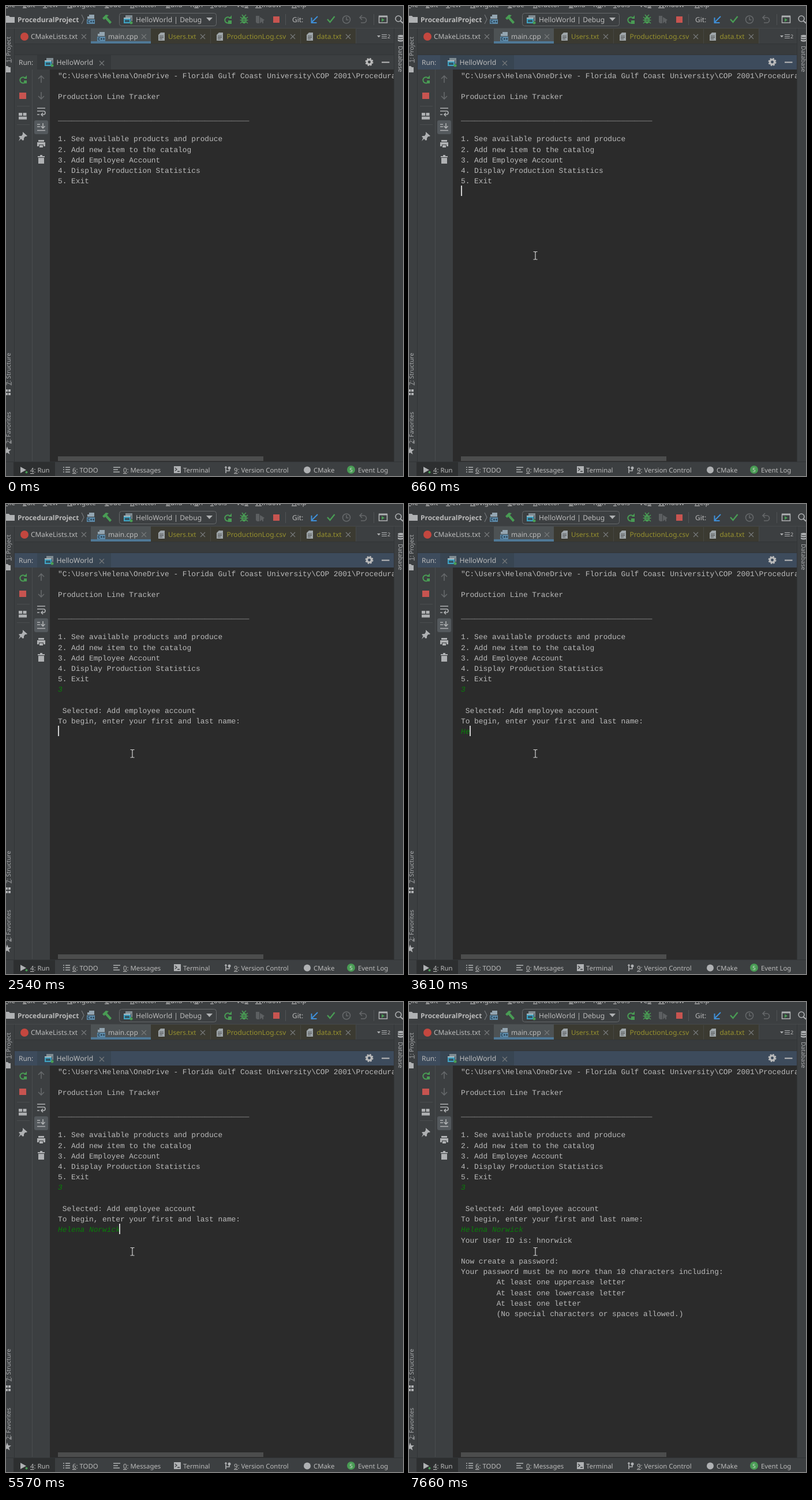
An HTML page for the animation above (8 s loop, 688 by 814 pixels).

```html
<!DOCTYPE html>
<html lang="en">
<head>
<meta charset="utf-8">
<title>Production Line Tracker</title>
<style>
html, body { margin: 0; width: 100%; height: 100%; overflow: hidden; background: #3c3f41; }
svg { display: block; width: 688px; height: 814px; }
text { font: 11.9px "Noto Sans", sans-serif; fill: #bbb; white-space: pre; text-rendering: geometricPrecision; }
.small text { font-size: 11.35px; }
.side text { font-size: 10.3px; fill: #a9abad; }
.olive text { fill: #97912f; }
#rows text { font: 12.85px "Liberation Mono", monospace; }
#rows .in { fill: #087f08; font-style: italic; }
u, .u { text-decoration: underline; }
.i { fill: none; stroke: #afb1b3; stroke-width: 1.6; }
.f { fill: #afb1b3; }
.dim { stroke: #65686a; }
.green { stroke: #499c54; }
.gf { fill: #499c54; }
.x { fill: none; stroke: #777a7c; stroke-width: 1.1; }
.line { stroke: #515456; fill: none; }
</style>
</head>
<body>
<svg viewBox="0 0 688 814">
  <defs>
    <path id="close" class="x" d="M-4-4L4 4M4-4L-4 4"/>
    <g id="rerun"><path class="i green" stroke-width="2" d="M4-3.5A5.2 5.2 0 1 0 5 3" style="stroke-width:2"/><path class="gf" d="M2-2h5v-6z"/></g>
    <g id="app">
      <path fill="#7f8b91" d="M3 0h12v10h-2V4H3z"/>
      <path fill="#40a4c4" d="M0 5h12v9H0z"/><path fill="#a9b7be" d="M0 4h12v2H0z"/>
      <path fill="#315767" d="M2 8h8v4H2z"/><circle class="gf" cx="13" cy="13" r="2.5"/>
    </g>
    <g id="cpp">
      <path fill="#93a5b1" d="M4 0h9v7H1V3h3z"/><path fill="#5c89a8" d="M0 8h14v8H0z"/>
      <path d="M5 10H2v4h3M6 12h3M7.500 10.500v3M10 12h3M11.500 10.500v3" stroke="#203544" fill="none"/>
    </g>
    <g id="doc"><path fill="#9da4a8" d="M4 0h7v14H0V4z"/><path d="M2 6h7M2 8.500h7M2 11h5" stroke="#4a4c4d" fill="none"/></g>
  </defs>

  <rect width="688" height="814" fill="#3c3f41"/>
  <g id="menu"></g>

  <!-- toolbar -->
  <path class="f" d="M0 17h5l2 2h8v10H0z"/>
  <text x="20" y="28" font-weight="700" style="font-weight:700">ProceduralProject</text>
  <path class="x" d="M131 15l4 8-4 8"/>
  <use href="#cpp" x="140" y="15"/>
  <path class="gf" d="M167 21l6-6 5 1-3 3 8 9-3 3-8-9-2 2z"/>
  <rect x="196.500" y="12.500" width="168" height="22" rx="4" fill="#3c3f41" stroke="#66696b"/>
  <use href="#app" x="204" y="16"/>
  <text x="225" y="28" style="font-size:12.1px">HelloWorld | Debug</text>
  <path class="f" d="M347 20h11l-5.500 6z"/>
  <use href="#rerun" x="384" y="24"/><path fill="#c75450" d="M386 24h6v6h-6z" opacity="0"/>
  <path class="gf" d="M385 25h6v6h-6z"/>
  <g><ellipse class="gf" cx="412.500" cy="24.500" rx="4.300" ry="6"/><path class="i green" d="M406 19l13 11M419 19l-13 11M405.500 24.500h14M409 15l3 4 4-4"/><path d="M410 23h5M410 26h5" stroke="#3c3f41"/></g>
  <path fill="#5c5f61" d="M433 17h6v13h-4l-2-2zM440 19l8 5-8 6z"/><path class="i dim" d="M445 30v-5"/>
  <path fill="#c75450" d="M463 18h11v11h-11z"/>
  <path class="line" d="M484.500 14v19M637.500 14v19"/>
  <text x="496" y="28">Git:</text>
  <path class="i" style="stroke:#3f8fd8;stroke-width:2" d="M540 18l-10 10M529.500 20v9h9"/>
  <path class="i green" style="stroke-width:2.4" d="M557 23l4.500 5 8-10"/>
  <circle class="i dim" cx="590" cy="23.500" r="6.500"/><path class="i dim" d="M590 19v5h3.500"/>
  <path class="i dim" d="M617 16l-4 4 4 4M613 20h7a4.500 4.500 0 0 1 0 9h-5"/>
  <path class="i" d="M646.500 18h14v11h-14z"/><path class="f" d="M646 16.500h15v3h-15z"/><path class="gf" d="M651 21l5 3-5 3.500z"/>
  <circle class="i" cx="680" cy="22" r="5"/><path class="i" style="stroke-width:2" d="M683.500 26l5 4"/>

  <!-- editor tabs -->
  <path fill="#3b3a31" d="M251 39h355v26H251z"/>
  <path fill="#4d5254" d="M147 39h104v26H147z"/><path fill="#4f7896" d="M147 61h104v4H147z"/>
  <path class="line" stroke-opacity=".5" d="M0 38.500h688M354.500 40v25M510.500 40v25M606.500 40v25"/>
  <circle cx="32" cy="53" r="7" fill="#c4473f"/>
  <text x="43" y="57">CMakeLists.txt</text>
  <use href="#cpp" x="158" y="45"/><text x="177" y="57">main.cpp</text>
  <g class="olive">
    <use href="#doc" x="264" y="46"/><text x="281" y="57" style="font-size:11.600px">Users.txt</text>
    <use href="#doc" x="365" y="46"/><text x="382.500" y="57">ProductionLog.csv</text>
    <use href="#doc" x="521" y="46"/><text x="538.500" y="57">data.txt</text>
  </g>
  <use href="#close" x="135" y="53"/><use href="#close" x="239" y="53"/><use href="#close" x="341" y="53"/>
  <use href="#close" x="497" y="53"/><use href="#close" x="593" y="53"/>
  <path class="f" d="M643 51h6l-3 3.500z"/><path d="M651 49.500h9M651 52.500h9M651 55.500h9" stroke="#afb1b3"/>
  <text x="661" y="56" style="font-size:9px">2</text>
  <path fill="#383b3d" d="M15 65h657v19H15z"/>
  <path d="M15 65.500h657M15 84.500h657" stroke="#323537"/>

  <!-- run panel -->
  <rect id="head" x="15" y="85" width="657" height="25"/>
  <rect id="tab" x="54" y="85" width="128" height="25"/>
  <text x="22" y="102">Run:</text>
  <use href="#app" x="67" y="90"/><text x="87.500" y="102" style="font-size:12.200px">HelloWorld</text>
  <use href="#close" x="166" y="99"/>
  <circle cx="629.500" cy="97" r="4" fill="none" stroke="#bbb" stroke-width="3.200"/>
  <circle cx="629.500" cy="97" r="6" fill="none" stroke="#bbb" stroke-width="2" stroke-dasharray="2.700 2.012"/>
  <path d="M651 97.500h13.500" stroke="#bbb" stroke-width="2"/>
  <path class="line" stroke-opacity=".7" d="M45.500 110v678M19 173.500h22M19 205.500h22"/>
  <use href="#rerun" x="29" y="128"/><path class="gf" d="M31 129h5v5h-5z"/>
  <path fill="#c75450" d="M23 150h12v11H23z"/>
  <path class="f" d="M22 185h6v5h-6zM29.500 185h6v5h-6zM22 191.500h14v5H22z"/>
  <path class="f" d="M29 218l8 7-2 1-2 0-2 3 0 3-2 1-7-7 2-1h3l2-3zM25 227l2 2-5 5z"/>
  <path class="i dim" d="M61 133v-12M56 126l5-5 5 5M61 149v12M56 156l5 5 5-5"/>
  <path class="i" d="M54 177h14M54 182h11a3 3 0 0 1 0 6h-4M54 188h4M64 185l-3 3 3 3"/>
  <rect x="49" y="198" width="24" height="24" rx="3" fill="#54595d"/>
  <path class="i" d="M54 205h5M54 209h5M54 215.500h14M64 203v8M60.500 208l3.500 3.500 3.500-3.500"/>
  <path class="f" d="M56 232h10v3H56zM54 236h14v7h-3v-3h-8v3h-3zM58 241h6v4h-6z"/>
  <path class="f" d="M55 260h12v2H55zM59 258h4v2h-4zM56 263h10v10H56z"/>

  <!-- console -->
  <rect x="76" y="110" width="596" height="679" fill="#2b2b2b"/>
  <g id="rows"></g>
  <rect id="caret" width="2" height="18" fill="#d0d0d0"/>
  <rect x="90" y="780" width="356" height="8" fill="#4c4d4d"/>

  <!-- side stripes -->
  <rect x="672" y="39" width="16" height="750" fill="#3c3f41"/>
  <path d="M14.500 39v750M672.500 39v750M0 789.500h688" stroke="#323537"/>
  <g class="side">
    <text transform="translate(7.500 98)rotate(-90)"><tspan class="u">1</tspan>: Project</text>
    <text transform="translate(7.500 657)rotate(-90)"><tspan class="u">7</tspan>: Structure</text>
    <text transform="translate(7.500 758)rotate(-90)"><tspan class="u">2</tspan>: Favorites</text>
    <text transform="translate(680 69)rotate(90)">Database</text>
  </g>
  <path class="f" d="M0 104h3l2 2h3v9H0zM0 664h3v4H0zM4 664h4v4H4zM0 670h3v4H0zM4 670h4v4H4z"/>
  <path class="f" d="M2 763l2 5h5l-4 3.500 1.500 5L2 773.500l-4.500 3 1.500-5z"/>
  <g class="f"><ellipse cx="684" cy="52" rx="5" ry="2"/><path d="M679 54q5 2.500 10 0v2.500q-5 2.500-10 0zM679 58q5 2.500 10 0v2.500q-5 2.500-10 0z"/></g>

  <!-- bottom bar -->
  <path fill="#2d2f30" d="M13 790h72v24H13z"/>
  <path class="f" d="M25 798l10 5.500-10 5.500z"/><circle class="gf" cx="35.500" cy="807.500" r="2"/>
  <path class="i" d="M99 799h2M103 799h8M99 803h2M103 803h8M99 807h2M103 807h8M186 799h12M186 803h8M186 807h11"/>
  <path class="f" d="M291 797h12v12h-12z"/><path d="M293 800l3 2.500-3 2.500M297 806h4" fill="none" stroke="#3c3f41" stroke-width="1.300"/>
  <path class="i" d="M381 797v12M381 805h6v-5M379 799h4"/><circle class="f" cx="387" cy="800" r="2.500"/>
  <circle class="f" cx="522" cy="803.500" r="6"/>
  <circle class="gf" cx="598" cy="803" r="7"/>
  <g class="small">
    <text x="42" y="808"><tspan class="u">4</tspan>: Run</text>
    <text x="115" y="808"><tspan class="u">6</tspan>: TODO</text>
    <text x="203" y="808"><tspan class="u">0</tspan>: Messages</text>
    <text x="307" y="808">Terminal</text>
    <text x="395" y="808"><tspan class="u">9</tspan>: Version Control</text>
    <text x="533" y="808">CMake</text>
    <text x="595.300" y="806.500" style="font-size:9.500px;fill:#ddd">5</text>
    <text x="610" y="808">Event Log</text>
  </g>
  <path id="mouse" fill="none" stroke="#d2d2d2" stroke-width="1.200" d="M-3.500-6.500H-1L0-5.500 1-6.500H3.500M0-5.500V6M-3.500 7H-1L0 6 1 7H3.500"/>
</svg>
<script>
const $ = id => document.getElementById(id);
const LOOP = 8000, LEFT = 90, PITCH = 18.22, ADVANCE = 7.64;

function addText(parent, x, y, str) {
  const el = document.createElementNS("http://www.w3.org/2000/svg", "text");
  el.setAttribute("x", x);
  el.setAttribute("y", y);
  el.textContent = str;
  return parent.appendChild(el);
}

// Menu captions, cut by the top edge; & marks the mnemonic letter.
[[-3, "&File"], [29, "&Edit"], [64, "&View"], [106, "&Navigate"], [171, "&Code"], [215, "&Refactor"],
 [277, "&Build"], [319, "R&un"], [354, "&Tools"], [399, "VC&S"], [432, "&Window"], [495, "&Help"]]
.forEach(([x, label]) => {
  addText($("menu"), x, 1.5, "").innerHTML = label.replace(/&(.)/, '<tspan class="u">$1</tspan>');
});

const NAME = "Helena Norwick";
const KEYS = [3240, 3610, 3690, 3770, 3860, 4020, 4160, 4470, 4850, 5020, 5110, 5340, 5410, 5570];
const TAB = " ".repeat(8);

// [row, time it appears, text]
const output = [
  [0, 0, '"C:\\Users\\Helena\\OneDrive - Florida Gulf Coast University\\COP 2001\\ProceduralProject'],
  [2, 0, "Production Line Tracker"],
  [4, 0, "_".repeat(43)],
  [6, 0, "1. See available products and produce"],
  [7, 0, "2. Add new item to the catalog"],
  [8, 0, "3. Add Employee Account"],
  [9, 0, "4. Display Production Statistics"],
  [10, 0, "5. Exit"],
  [13, 2540, " Selected: Add employee account"],
  [14, 2540, "To begin, enter your first and last name:"],
  [16, 5950, "Your User ID is: hnorwick"],
  [18, 5950, "Now create a password:"],
  [19, 5950, "Your password must be no more than 10 characters including:"],
  [20, 5950, TAB + "At least one uppercase letter"],
  [21, 5950, TAB + "At least one lowercase letter"],
  [22, 5950, TAB + "At least one letter"],
  [23, 5950, TAB + "(No special characters or spaces allowed.)"]
].map(([row, from, str]) => ({ from, el: addRow(row, str) }));

function addRow(row, str) {
  return addText($("rows"), LEFT, 125 + row * PITCH, str);
}

const choice = addRow(11, ""), person = addRow(15, "");
choice.classList.add("in");
person.classList.add("in");

// [time, caret row]; row 0 hides the caret
const CARET = [[0, 0], [660, 11], [1120, 0], [1670, 11], [2370, 12], [2540, 15], [3150, 0], [3240, 15],
               [5730, 16], [5950, 24], [6650, 0], [7140, 24], [7660, 0]];

function mousePos(t) {
  const p = Math.min(5, Math.floor((t - 120) / 80)) / 5, q = 1 - p;
  const curve = (a, b, c) => q * q * a + 2 * q * p * b + p * p * c;
  return [curve(530, 80, 219), curve(795, 520, 432)];
}

function show(el, on) {
  el.style.visibility = on ? "visible" : "hidden";
}

function draw() {
  const t = performance.now() % LOOP;
  const focused = t >= 660;
  $("head").setAttribute("fill", focused ? "#3d4b5c" : "#3c3f41");
  $("tab").setAttribute("fill", focused ? "#384552" : "#35383a");

  output.forEach(({ from, el }) => show(el, t >= from));
  const typed = KEYS.filter(k => k <= t).length;
  choice.textContent = t >= 2080 ? "3" : "";
  person.textContent = NAME.slice(0, typed);

  const row = CARET.filter(([at]) => at <= t).pop()[1];
  const col = row === 15 ? typed : row === 11 && t >= 2080 ? 1 : 0;
  show($("caret"), row);
  $("caret").setAttribute("x", LEFT + Math.floor(col * ADVANCE));
  $("caret").setAttribute("y", Math.round(110.7 + row * PITCH));

  show($("mouse"), t >= 120);
  if (t >= 120) $("mouse").setAttribute("transform", `translate(${mousePos(t)})`);
  requestAnimationFrame(draw);
}
draw();
</script>
</body>
</html>
```
